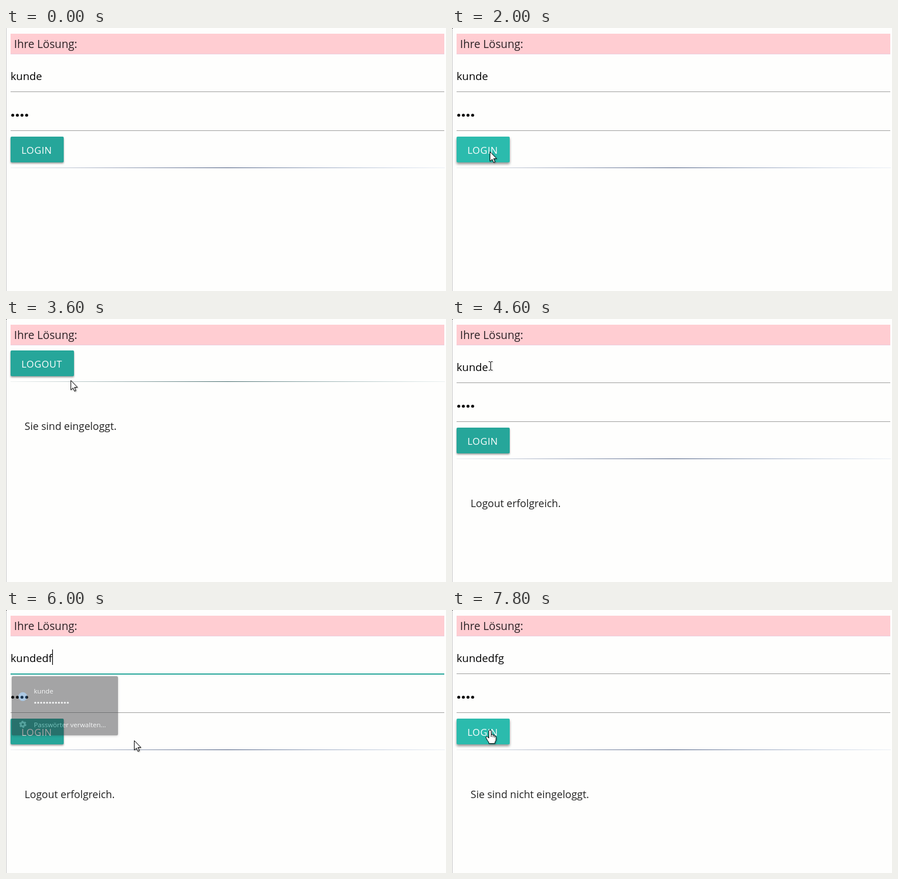
Animation of 770x460 px, one loop 8 s. Source, as an HTML page:

```html
<!DOCTYPE html>
<html lang="de">
<head>
<meta charset="utf-8">
<title>Login</title>
<style>
  html, body { margin: 0; width: 100%; height: 100%; overflow: hidden; background: #fefefd; }
  svg { display: block; width: 770px; height: 460px; font-family: "Open Sans", "Noto Sans", sans-serif; }
  .field { font-size: 18.8px; fill: #000; }
  .message { font-size: 18px; fill: #212121; }
  .label { font-size: 16.8px; letter-spacing: .5px; fill: #fff; }
  .menu { font-size: 12px; fill: #e8eaed; }
  .button rect { fill: #26a69a; filter: drop-shadow(0 2px 1.5px rgba(0, 0, 0, .38)); }
  .button.hover rect { fill: #2bbbad; filter: drop-shadow(0 3px 2px rgba(0, 0, 0, .42)); }
  #popup { transform-origin: 103px 167.5px; }
  #popup .panel { filter: drop-shadow(0 1px 2px rgba(0, 0, 0, .4)); }
  #cursor { filter: drop-shadow(1.5px 1.5px 1px rgba(0, 0, 0, .35)); }
  #cursor path { fill: #fff; stroke: #000; stroke-linejoin: round; }
  #cursor #beam { fill: none; stroke: #111; }
</style>
</head>
<body>
<svg viewBox="0 0 770 460">
  <defs>
    <linearGradient id="blueRule">
      <stop offset="0" stop-color="#50658f" stop-opacity=".1"/>
      <stop offset=".5" stop-color="#42547a"/>
      <stop offset="1" stop-color="#7f9cc8" stop-opacity=".15"/>
    </linearGradient>
    <linearGradient id="greenRule">
      <stop offset="0" stop-color="#5f8285" stop-opacity=".1"/>
      <stop offset=".5" stop-color="#42686a"/>
      <stop offset="1" stop-color="#7fa5a8" stop-opacity=".15"/>
    </linearGradient>
  </defs>

  <rect width="770" height="460" fill="#fefefd"/>
  <rect width="1" height="460" fill="#c8c8c8"/>
  <rect id="corner" width="1" height="1"/>
  <rect x="8" y="10" width="759" height="36" fill="#ffcdd2"/>
  <rect x="8" y="45" width="759" height="1" fill="#eccbdc"/>
  <text x="14" y="35" font-size="19.3" fill="#2b2326">Ihre Lösung:</text>

  <g id="loginPage">
    <text id="user" class="field" x="8" y="91"></text>
    <rect id="caret" y="69" width="1.2" height="27"/>
    <rect id="userLine" x="8" y="111" width="759"/>
    <g id="password"></g>
    <rect x="8" y="179" width="759" height="1" fill="#9e9e9e"/>
    <g id="loginButton" class="button">
      <rect x="8" y="190" width="93" height="45" rx="2"/>
      <text class="label" x="27" y="220">LOGIN</text>
    </g>
    <rect x="8" y="244" width="760" height="1" fill="url(#blueRule)"/>
    <text id="message" class="message" x="32.5" y="329"></text>
  </g>

  <g id="logoutPage">
    <g id="logoutButton" class="button">
      <rect x="8" y="55" width="111" height="45" rx="2"/>
      <text class="label" x="27" y="85">LOGOUT</text>
    </g>
    <rect x="8" y="109" width="760" height="1" fill="url(#greenRule)"/>
    <text class="message" x="32.5" y="194">Sie sind eingeloggt.</text>
  </g>

  <g id="popup">
    <rect class="panel" x="7" y="114" width="192" height="107" rx="3" fill="#292a2d"/>
    <rect x="7" y="180" width="192" height="1" fill="#434447"/>
    <circle cx="27" cy="151" r="8" fill="#3c7fc0"/>
    <text class="menu" x="47" y="145">kunde</text>
    <g id="savedDots" fill="#e8eaed"></g>
    <g fill="none" stroke="#9aa0a6">
      <circle cx="27" cy="201" r="3.6" stroke-width="3"/>
      <circle cx="27" cy="201" r="5.6" stroke-width="1.8" stroke-dasharray="3.2 2.664"/>
    </g>
    <text class="menu" x="47" y="206">Passwörter verwalten...</text>
  </g>

  <g id="cursor">
    <path id="arrow" d="M0 0V16.5L3.8 13 6.4 18.8 8.8 17.7 6.3 12H11.5Z"/>
    <g id="hand">
      <path d="M-2 2A2 2 0 0 1 2 2V8Q5 6.5 5.6 9Q8 7.8 8.4 10.3Q10.6 10 10.6 12.5V16Q10.6 19 8.6 21V23.5H-2V21.5Q-4 19 -6.5 14.5Q-8 11 -5 11.4L-2 14Z"/>
      <path d="M2 8V12M5.4 9V12.5M8.2 10.5V13"/>
    </g>
    <path id="beam" d="M-3 -7.5H-1L.5 -6.5 2 -7.5H4M.5 -6.5V6.5M-3 7.5H-1L.5 6.5 2 7.5H4"/>
  </g>
</svg>

<script>
const LOOP = 8000, STEP = 200;
const $ = id => document.getElementById(id);
const show = (id, on) => { $(id).style.display = on ? "" : "none"; };

// time, x, y
const path = [
  [200, 640, 190], [400, 420, 236], [600, 245, 234], [800, 140, 226], [1000, 84, 219],
  [1200, 66.5, 216.5], [2400, 66.5, 216.5], [2600, 72, 220], [3000, 100, 180],
  [3600, 113.5, 107.5], [3800, 92, 89], [4200, 67, 82], [4800, 67, 82],
  [5000, 82, 83], [5200, 98, 83], [5600, 98, 83], [5800, 160, 155],
  [6000, 224.5, 228.5], [6200, 170, 226], [6400, 110, 217], [6600, 74, 211], [6800, 66.5, 210]
];
const names = [[0, "kunde"], [5800, "kunded"], [6000, "kundedf"], [6200, "kundedfg"]];
const messages = [[0, ""], [4600, "Logout erfolgreich."], [7800, "Sie sind nicht eingeloggt."]];
const pages = [[0, "login"], [2200, "logout"], [4600, "login"]];

const at = (table, t) => table.findLast(row => row[0] <= t)[1];
const within = (t, from, to) => t >= from && t < to;

function pointer(t) {
  const next = path.findIndex(row => row[0] > t);
  if (next < 1) return path.at(-1).slice(1);
  const [t0, x0, y0] = path[next - 1], [t1, x1, y1] = path[next];
  const k = (t - t0) / (t1 - t0);
  return [x0 + (x1 - x0) * k, y0 + (y1 - y0) * k];
}

function dots(id, count, x, y, pitch, r) {
  for (let i = 0; i < count; i++) {
    const dot = document.createElementNS("http://www.w3.org/2000/svg", "circle");
    Object.entries({ cx: x + i * pitch, cy: y, r }).forEach(([k, v]) => dot.setAttribute(k, v));
    $(id).append(dot);
  }
}

function drawCursor(t, login) {
  const [x, y] = pointer(t);
  const inside = (right, top, bottom) => x >= 8 && x < right && y >= top && y < bottom;
  const visible = t >= 200;
  const onLogin = visible && login && inside(101, 190, 235);
  const onLogout = visible && !login && inside(119, 55, 100);
  const waiting = t === 2000 || t === 4400;
  const onField = login && (within(y, 66, 112) || (y > 134 && y < 180 && t < 5000));
  const shape = (onLogin || onLogout) && !waiting ? "hand" : onField ? "beam" : "arrow";

  $("loginButton").classList.toggle("hover", onLogin);
  $("logoutButton").classList.toggle("hover", onLogout);
  show("cursor", visible);
  for (const id of ["arrow", "hand", "beam"]) show(id, id === shape);
  $("cursor").setAttribute("transform", `translate(${x} ${y})`);
}

function draw(t) {
  const login = at(pages, t) === "login";
  const focused = within(t, 5000, 7000);
  const closing = t >= 6000;

  show("loginPage", login);
  show("logoutPage", !login);
  show("corner", t >= 1600);
  $("user").textContent = at(names, t);
  $("message").textContent = at(messages, t);
  $("userLine").setAttribute("height", focused ? 2 : 1);
  $("userLine").setAttribute("fill", focused ? "#26a69a" : t === 7000 ? "#62a29c" : "#9e9e9e");

  show("caret", within(t, 5000, 6800));
  if (login) $("caret").setAttribute("x", 8 + $("user").getComputedTextLength());

  show("popup", within(t, 5200, 6200));
  $("popup").style.opacity = closing ? .42 : 1;
  $("popup").style.transform = closing ? "scale(.969)" : "none";
  drawCursor(t, login);
}

dots("password", 4, 11.8, 152.5, 8.1, 2.6);
dots("savedDots", 12, 49.5, 162, 5.35, 1.7);

const start = performance.now();
function tick(now) {
  const t = Math.max(0, now - start) % LOOP;
  draw(Math.floor(t / STEP) * STEP);
  requestAnimationFrame(tick);
}
draw(0);
requestAnimationFrame(tick);
</script>
</body>
</html>
```
